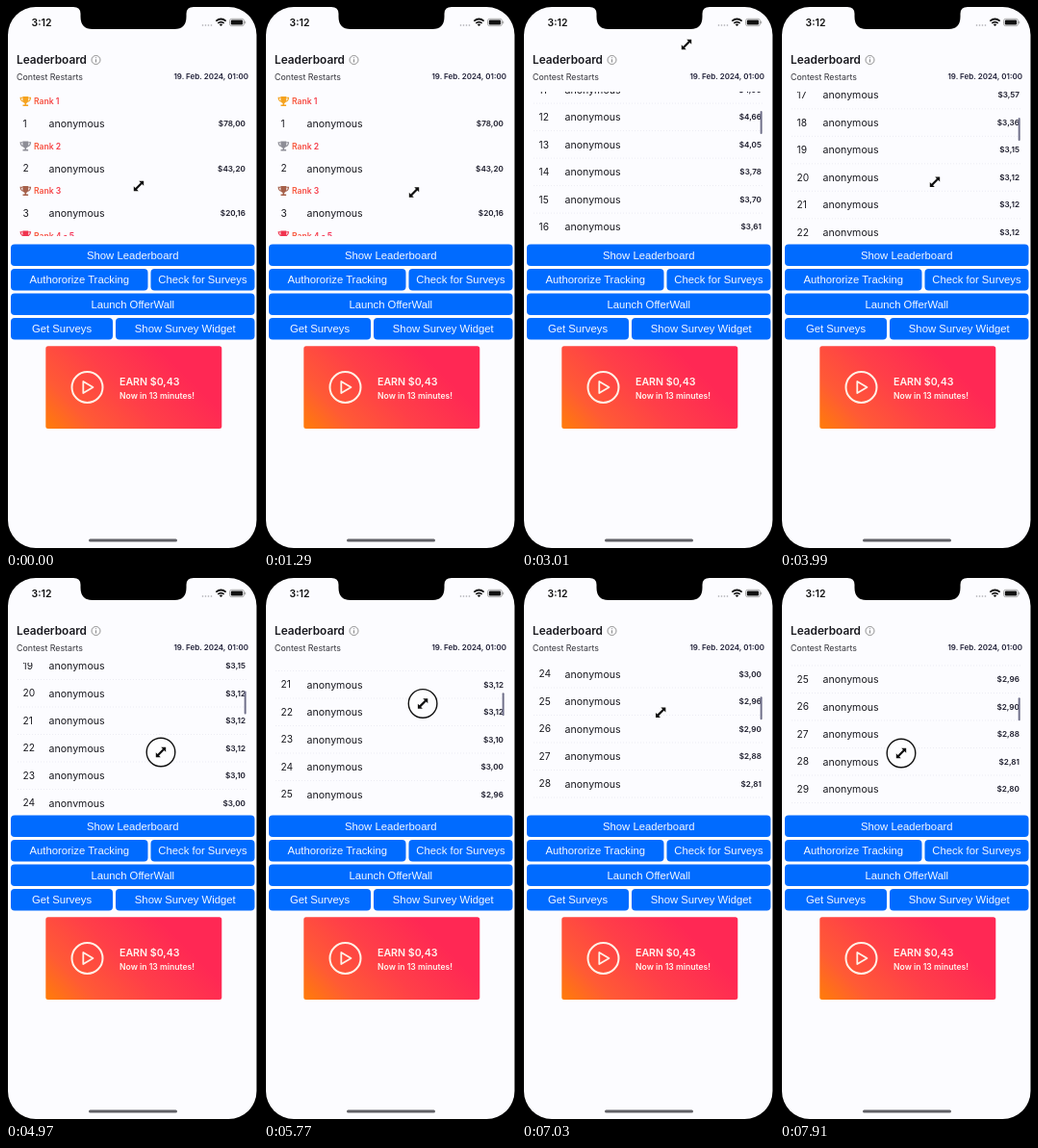
Animation, 262 px wide and 564 px high, one loop 8 s. Source, as an HTML page:

```html
<!DOCTYPE html>
<html lang="en">
<head>
<meta charset="utf-8">
<title>Leaderboard</title>
<style>
  html, body { margin: 0; width: 100%; height: 100%; overflow: hidden; background: #000; }
  svg { display: block; width: 262px; height: 564px; font-family: Inter, "Open Sans", sans-serif; }
  .button { font-family: "Liberation Sans", Arial, sans-serif; }
</style>
</head>
<body>
<svg id="stage" viewBox="0 0 262 564">
  <defs>
    <clipPath id="listClip"><rect x="3" y="89" width="256" height="150"/></clipPath>
    <linearGradient id="rankInk" gradientUnits="userSpaceOnUse" x1="26" y1="0" x2="74" y2="0">
      <stop offset="0" stop-color="#f8603a"/><stop offset="1" stop-color="#f42556"/>
    </linearGradient>
    <linearGradient id="bannerFill" gradientUnits="userSpaceOnUse" x1="41" y1="439" x2="175.500" y2="304.500">
      <stop offset="0" stop-color="#ff7d08"/><stop offset=".2" stop-color="#ff5a35"/>
      <stop offset=".45" stop-color="#ff3f48"/><stop offset=".75" stop-color="#ff2854"/>
    </linearGradient>
  </defs>
  <rect width="262" height="564" fill="#000"/>
  <rect x="2" y="1" width="258.500" height="562" rx="29" fill="#fcfcff"/>
  <path d="M70 0V1Q77.500 1 77.500 8V11Q77.500 24 90 24H175Q187.500 24 187.500 11V8Q187.500 1 195 1V0Z"/>

  <g id="statusBar">
    <g fill="#a5a5aa">
      <circle cx="204.500" cy="20" r=".8"/><circle cx="207.500" cy="20" r=".8"/>
      <circle cx="210.500" cy="20" r=".8"/><circle cx="213.500" cy="20" r=".8"/>
    </g>
    <g fill="none" stroke="#111" stroke-width="1.700">
      <path d="M218.300 15.700Q223.500 11.300 228.700 15.700M220.300 17.900Q223.500 15.200 226.700 17.900"/>
    </g>
    <path d="M221.700 19.200Q223.500 17.800 225.300 19.200L223.500 21Z" fill="#111"/>
    <rect x="232.500" y="13.300" width="15" height="7.400" rx="2.200" fill="none" stroke="#999" stroke-width=".8"/>
    <rect x="233.800" y="14.600" width="12.400" height="4.800" rx="1.200" fill="#111"/>
    <path d="M248.700 15.700V18.300" stroke="#999"/>
  </g>

  <g id="chrome">
    <circle cx="93.500" cy="56" r="4.500" fill="none" stroke="#777" stroke-width=".8"/>
    <path d="M93.500 55.300V58.500M93.500 53.300V54.200" stroke="#777" stroke-width=".9"/>
    <rect x="86" y="553.500" width="92" height="3" rx="1.500" fill="#606066"/>
  </g>

  <g clip-path="url(#listClip)"><g id="list"></g></g>
  <rect id="thumb" x="247.700" width="2" height="24" rx="1" fill="#72728c"/>
  <g id="buttons"></g>

  <g id="banner">
    <rect x="41.300" y="353.200" width="183" height="85.800" rx="2.500" fill="url(#bannerFill)"/>
    <g fill="none" stroke="#fff1e6" stroke-width="2" stroke-linejoin="round">
      <circle cx="84.500" cy="396" r="16"/>
      <path d="M80.300 390V402L90.500 396Z" stroke-width="1.800"/>
    </g>
  </g>

  <g id="cursor">
    <circle id="touch" r="14.800" fill="#fff" fill-opacity=".7" stroke="#111" stroke-width="1.400"/>
    <path d="M5.200-5.200V-.2L3.500-1.900L-1.900 3.500L-.2 5.200H-5.200V.2L-3.500 1.900L1.900-3.500L.2-5.200Z"
      fill="#111" stroke="#fff" stroke-width="1.500" stroke-linejoin="round" paint-order="stroke"/>
  </g>
</svg>
<script>
const $ = id => document.getElementById(id);

function add(parent, tag, attrs, content = '') {
  const node = document.createElementNS('http://www.w3.org/2000/svg', tag);
  for (const key in attrs) node.setAttribute(key, attrs[key]);
  node.textContent = content;
  parent.append(node);
  return node;
}

// Places text with its capitals centred on y.
function label(parent, content, x, y, size, weight = 400, fill = '#19191f', anchor = 'start') {
  return add(parent, 'text', {
    x, y: y + size * 0.36, fill, 'font-size': size, 'font-weight': weight, 'text-anchor': anchor
  }, content);
}

label($('statusBar'), '3:12', 37, 17, 10.4, 600, '#111', 'middle');
label($('chrome'), 'Leaderboard', 11, 56, 11.8, 600);
label($('chrome'), 'Contest Restarts', 11, 73.5, 8.8, 400, '#33333a');
label($('chrome'), '19. Feb. 2024, 01:00', 252, 73.5, 8, 600, '#22223a', 'end');
label($('banner'), 'EARN $0,43', 118, 390.5, 10.6, 600, '#fff4ee');
label($('banner'), 'Now in 13 minutes!', 118, 405, 8.6, 600, '#fff4ee');

const buttonSpecs = [
  ['Show Leaderboard', 5, 258.5, 247.5],
  ['Authororize Tracking', 5, 147.5, 273],
  ['Check for Surveys', 150.5, 258.5, 273],
  ['Launch OfferWall', 5, 258.5, 298.5],
  ['Get Surveys', 5, 111, 324],
  ['Show Survey Widget', 114, 258.5, 324]
];
for (const [caption, left, right, y] of buttonSpecs) {
  add($('buttons'), 'rect', { x: left, y, width: right - left, height: 22.5, rx: 4, fill: '#006bff' });
  label($('buttons'), caption, (left + right) / 2, y + 11.3, 11.3, 400, '#f4f8ff', 'middle')
    .setAttribute('class', 'button');
}

const ROW = 28.5, HEADER = 18;
const tiers = {
  1: ['1', '#f5a31f'], 2: ['2', '#8d8d96'], 3: ['3', '#a5604a'],
  4: ['4 - 5', '#f0344f'], 6: ['6 - 10', '#f0344f'], 11: ['11 - 50', '#f0344f']
};
const prizes = ('78,00 43,20 20,16 18,00 18,00 18,00 8,80 6,40 5,90 5,40 4,90 4,66 4,05 3,78 3,70 ' +
  '3,61 3,57 3,36 3,15 3,12 3,12 3,12 3,10 3,00 2,96 2,90 2,88 2,81 2,80 2,76').split(' ');

function trophy(y, color) {
  const g = add($('list'), 'g', { transform: `translate(20.3 ${y})`, fill: color });
  add(g, 'path', { d: 'M-3-5H3V-2Q3 1.5 .8 2V3.5H2.800V5H-2.800V3.5H-.8V2Q-3 1.5-3-2Z' });
  add(g, 'path', {
    d: 'M-3-3.700H-5.200Q-5-.3-2.400 .2M3-3.700H5.200Q5-.3 2.400 .2',
    fill: 'none', stroke: color, 'stroke-width': 1.1
  });
}

let offset = 90;
prizes.forEach((prize, i) => {
  const rank = i + 1, tier = tiers[rank];
  if (tier) {
    trophy(offset + HEADER / 2, tier[1]);
    label($('list'), 'Rank ' + tier[0], 29, offset + HEADER / 2, 8.6, 600, 'url(#rankInk)');
    offset += HEADER;
  } else {
    add($('list'), 'path', {
      d: `M12 ${offset}H250`, stroke: '#c9c9dc', 'stroke-width': 0.7, 'stroke-dasharray': '1 2', opacity: 0.45
    });
  }
  const y = offset + ROW / 2;
  label($('list'), rank, 17.5, y, 10.2);
  label($('list'), 'anonymous', 44.5, y, 10.6);
  label($('list'), '$' + prize, 249, y, 8.2, 600, '#1c1c2c', 'end');
  offset += ROW;
});

const LOOP = 8000;
const cursorPath = [
  [0, 138, 187], [900, 138, 187], [1500, 163, 196], [1720, 163, 196], [2130, 171, 40],
  [3150, 171, 40], [3700, 161, 183], [4570, 161, 182], [5350, 161, 182], [6180, 169, 83],
  [6700, 169, 83], [7300, 126, 183], [LOOP, 126, 183]
];
const touches = [[1640, 2050], [4570, 6180], [7543, LOOP]];

const clamp = u => Math.min(1, Math.max(0, u));
const smooth = u => u * u * (3 - 2 * u);
const glide = (ms, distance) => distance * (1 - Math.exp(-ms / 1500));

// Two drags, each followed by a glide that the next touch stops.
function scrollAt(t) {
  if (t < 2130) return 135 * clamp((t - 1750) / 380) ** 1.2;
  if (t < 4570) return 135 + glide(t - 2130, 620);
  if (t < 6180) return 633 + 73.4 * smooth(clamp((t - 5350) / 830));
  return 706.4 + glide(Math.min(t, 7543) - 6180, 140);
}

function cursorAt(t) {
  const i = cursorPath.findIndex(p => p[0] > t);
  const [t0, x0, y0] = cursorPath[i - 1], [t1, x1, y1] = cursorPath[i];
  const u = smooth((t - t0) / (t1 - t0));
  return [x0 + (x1 - x0) * u, y0 + (y1 - y0) * u];
}

const startTime = performance.now();
function draw(now) {
  const t = Math.max(0, now - startTime) % LOOP;
  const scroll = scrollAt(t);
  $('list').setAttribute('transform', `translate(0 ${-scroll})`);
  $('thumb').setAttribute('y', 91.3 + scroll * 0.043);
  $('thumb').setAttribute('opacity', t > 1750 ? 1 : 0);
  $('cursor').setAttribute('transform', `translate(${cursorAt(t)})`);
  $('touch').setAttribute('opacity', touches.some(([a, b]) => t >= a && t < b) ? 1 : 0);
  requestAnimationFrame(draw);
}
draw(startTime);
</script>
</body>
</html>
```
